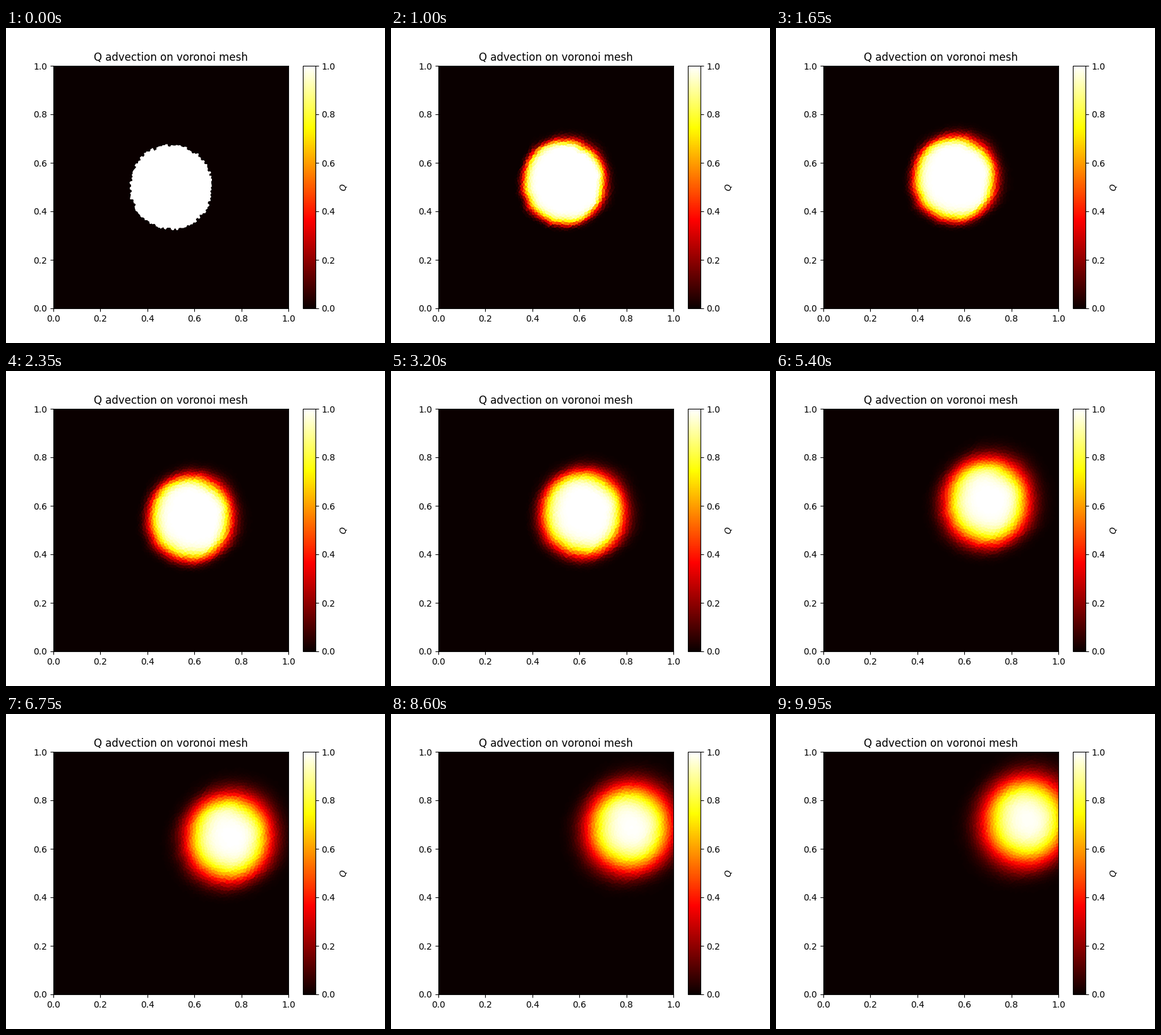
Recreate the animation shown at these times as a matplotlib script. Size 600 px wide and 500 px high, loop 10000 ms.

```python
import numpy as np
import matplotlib.pyplot as plt
from matplotlib.animation import FuncAnimation
from matplotlib.cm import ScalarMappable
from matplotlib.colors import Normalize
from matplotlib.tri import Triangulation

CELLS = 7000
FRAMES = 200
INTERVAL = 50
STEP = np.array([0.00182, 0.00109])   # displacement per frame
RADIUS2 = 0.03
WIDTH, HEIGHT = 372, 385              # plot area in pixels
MARGIN = 0.06


def cross(a, b):
    return a[:, 0] * b[:, 1] - a[:, 1] * b[:, 0]


def with_mirrors(pts):
    """Reflect points near the walls so that border cells are closed."""
    for axis in (0, 1):
        low = pts[pts[:, axis] < MARGIN].copy()
        high = pts[pts[:, axis] > 1 - MARGIN].copy()
        low[:, axis] *= -1
        high[:, axis] = 2 - high[:, axis]
        pts = np.vstack([pts, low, high])
    return pts


def circumcenters(a, b, c):
    u, v = b - a, c - a
    d = 2 * cross(u, v)
    d = np.where(np.abs(d) < 1e-14, 1e-14, d)
    uu, vv = (u ** 2).sum(1), (v ** 2).sum(1)
    x = (v[:, 1] * uu - u[:, 1] * vv) / d
    y = (u[:, 0] * vv - v[:, 0] * uu) / d
    return a + np.column_stack([x, y])


def voronoi_faces(seeds):
    """Cell pairs and the two end points of the face between them."""
    pts = with_mirrors(seeds)
    tri = Triangulation(pts[:, 0], pts[:, 1])
    t = tri.triangles
    centers = circumcenters(*(pts[t[:, k]] for k in range(3)))
    pairs, starts, ends = [], [], []
    for k in range(3):
        other = tri.neighbors[:, k]
        once = np.flatnonzero(other > np.arange(len(t)))
        pairs.append(np.column_stack([t[once, k], t[once, (k + 1) % 3]]))
        starts.append(centers[once])
        ends.append(centers[other[once]])
    pairs, starts, ends = map(np.vstack, (pairs, starts, ends))
    keep = pairs.min(axis=1) < len(seeds)
    return pts, pairs[keep], starts[keep], ends[keep]


def cell_geometry(pts, pairs, starts, ends):
    area = np.zeros(len(pts))
    moment = np.zeros_like(pts)
    for side in (0, 1):
        cell = pairs[:, side]
        p = pts[cell]
        part = 0.5 * np.abs(cross(starts - p, ends - p))
        np.add.at(area, cell, part)
        np.add.at(moment, cell, part[:, None] * (p + starts + ends) / 3)
    return area[:CELLS], moment[:CELLS] / area[:CELLS, None]


def make_seeds(relaxations=8):
    seeds = np.random.default_rng(4).random((CELLS, 2))
    for _ in range(relaxations):
        seeds = cell_geometry(*voronoi_faces(seeds))[1]
    return seeds


def advect(seeds):
    """First-order upwind transport of a disc; one state per frame."""
    pts, pairs, starts, ends = voronoi_faces(seeds)
    area = cell_geometry(pts, pairs, starts, ends)[0]
    i, j = pairs.T
    normal = pts[j] - pts[i]
    normal /= np.hypot(*normal.T)[:, None]
    flow = normal @ STEP * np.hypot(*(ends - starts).T)
    upwind = np.where(flow > 0, i, j)

    q = np.zeros(len(pts))
    q[:CELLS] = ((seeds - 0.5) ** 2).sum(1) < RADIUS2
    states = []
    for _ in range(FRAMES):
        states.append(q[:CELLS].copy())
        flux = flow * q[upwind]
        gain = (np.bincount(j, flux, len(pts))
                - np.bincount(i, flux, len(pts)))
        q[:CELLS] += gain[:CELLS] / area
    return states


def label_pixels(seeds, nx, ny, reach=0.03):
    """Index of the nearest seed for every sample of an nx by ny grid."""
    xs = (np.arange(nx) + 0.5) / nx
    ys = (np.arange(ny) + 0.5) / ny
    best = np.full((ny, nx), np.inf)
    label = np.zeros((ny, nx), int)
    for k, (x, y) in enumerate(seeds):
        c0, c1 = np.searchsorted(xs, (x - reach, x + reach))
        r0, r1 = np.searchsorted(ys, (y - reach, y + reach))
        dist = (ys[r0:r1, None] - y) ** 2 + (xs[c0:c1] - x) ** 2
        window = best[r0:r1, c0:c1]
        closer = dist < window
        window[closer] = dist[closer]
        label[r0:r1, c0:c1][closer] = k
    return label


seeds = make_seeds()
states = advect(seeds)
labels = label_pixels(seeds, 2 * WIDTH, 2 * HEIGHT)
samples = [labels[a::2, b::2].copy() for a in (0, 1) for b in (0, 1)]
cmap = plt.get_cmap("hot")


def picture(n):
    colors = cmap(np.clip(states[n], 0, 1), bytes=True)[:, :3]
    colors = colors.astype(np.uint16)
    return (sum(colors[s] for s in samples) // 4).astype(np.uint8)


fig, ax = plt.subplots(figsize=(6, 5), dpi=100)
image = ax.imshow(picture(0), extent=(0, 1, 0, 1), origin="lower",
                  aspect="auto", interpolation="nearest")
fig.colorbar(ScalarMappable(Normalize(0, 1), cmap), ax=ax, label="$Q$")
ax.set_title("Q advection on voronoi mesh")


def update(n):
    image.set_data(picture(n))
    return image,


anim = FuncAnimation(fig, update, frames=FRAMES, interval=INTERVAL,
                     repeat=True, repeat_delay=0)
plt.show()
```
